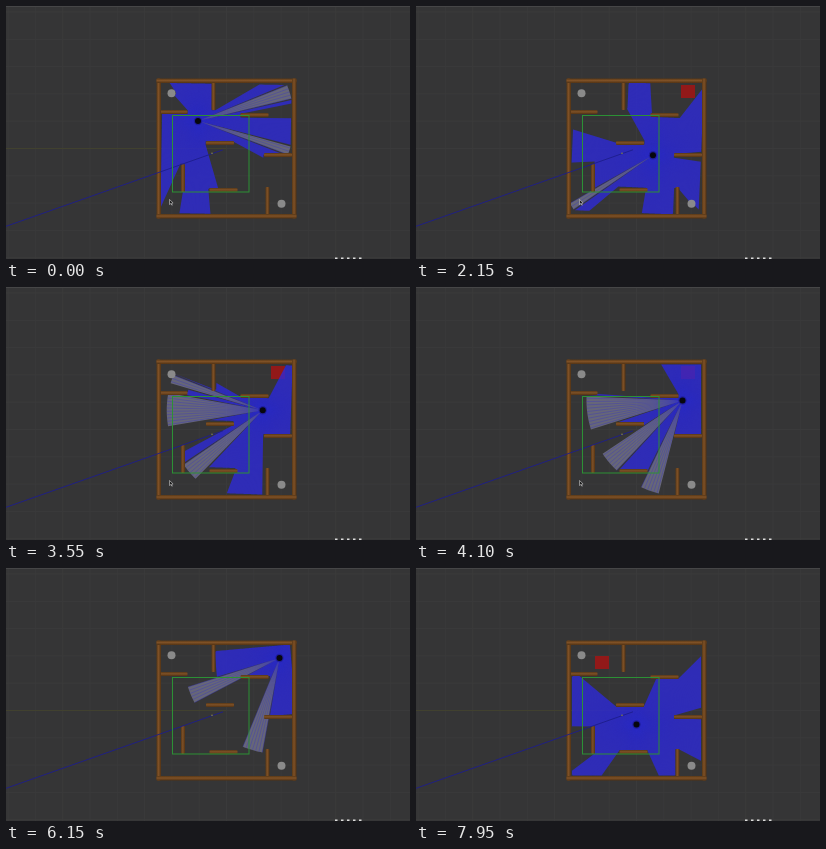
Recreate the animation shown at these times as an HTML page with a canvas. Size 404 px wide and 253 px high, loop 8 s.

```html
<!DOCTYPE html>
<html lang="en">
<head>
<meta charset="utf-8">
<title>Lidar robot in a maze</title>
<style>
  html, body { margin: 0; width: 100%; height: 100%; overflow: hidden; background: #353536; }
  canvas { display: block; width: 404px; height: 253px; }
</style>
</head>
<body>
<canvas id="stage"></canvas>
<script>
const W = 404, H = 253, LOOP = 8000, STEP = 50, TURN = Math.PI * 2;
const CX = 220.5, CY = 142.5;           // world origin on the stage
const HALF = 70, THICK = 4.5;           // outer wall
const REACH_X = 64.5, REACH_Y = 65;     // room as the lidar sees it
const RANGE = 96, RAYS = 360, POST_R = 4;

const canvas = document.getElementById('stage');
const ratio = window.devicePixelRatio || 1;
canvas.width = W * ratio;
canvas.height = H * ratio;
const ctx = canvas.getContext('2d');
ctx.scale(ratio, ratio);

// All inner walls share one size and are given by their centres.
const across = (x, y) => [x - 14, y - 2, 28, 4];
const upright = (x, y) => [x - 2, y - 14, 4, 28];
const walls = [
  across(167.5, 106), across(248.5, 109), across(214, 137),
  across(272, 149), across(217.5, 184),
  upright(207.5, 90), upright(177, 172), upright(261.5, 195)
];
const frame = [-1, 1].flatMap(side => {
  const shift = side * (HALF - THICK / 2) - THICK / 2;
  return [
    [CX + shift, CY - HALF, THICK, 2 * HALF],
    [CX - HALF, CY + shift, 2 * HALF, THICK]
  ];
});
const posts = [-1, 1].map(side => [CX + side * 55, CY + side * 55.2]);

// Key points: time, x, y, scan skew in degrees caused by turning
const robotKeys = [
  [0, 192, 115, 1], [700, 196, 148, 0], [1250, 220.5, 160.5, 0],
  [1900, 234, 154, 2], [3000, 247, 133, 4], [4100, 266.5, 113.5, 0],
  [5000, 271.5, 95, 8], [5400, 273.5, 90, -5], [6150, 273.5, 90, -5],
  [7000, 256, 126, 0], [7950, 220.5, 156.5, 0]
];
const cursorKeys = [
  [0, 163.5, 193.5], [4500, 163.5, 193.5], [5000, 104, 223.5],
  [5400, 87, 235], [6050, 127, 254]
];
const goals = [
  { from: 500, to: 4600, x: 272, y: 85.5 },
  { from: 6500, to: LOOP, x: 186, y: 94.5 }
];

function along(keys, t) {
  const i = keys.findIndex(key => key[0] > t);
  if (i < 0) return keys[keys.length - 1].slice(1);
  const a = keys[i - 1], b = keys[i];
  const k = (t - a[0]) / (b[0] - a[0]);
  return a.map((v, n) => v + (b[n] - v) * k).slice(1);
}

function hitBox(ox, oy, dx, dy, [x, y, w, h]) {
  const ax = (x - ox) / dx, bx = (x + w - ox) / dx;
  const ay = (y - oy) / dy, by = (y + h - oy) / dy;
  const near = Math.max(Math.min(ax, bx), Math.min(ay, by));
  const far = Math.min(Math.max(ax, bx), Math.max(ay, by));
  return near > 0 && near <= far ? near : Infinity;
}

function hitPost(ox, oy, dx, dy, [px, py]) {
  const b = (px - ox) * dx + (py - oy) * dy;
  const d = b * b - (px - ox) ** 2 - (py - oy) ** 2 + POST_R ** 2;
  return b > 0 && d > 0 ? b - Math.sqrt(d) : Infinity;
}

function castRay(ox, oy, angle, skew) {
  const dx = Math.cos(angle), dy = Math.sin(angle);
  const reach = Math.min(
    (CX + Math.sign(dx) * REACH_X - ox) / dx,
    (CY + Math.sign(dy) * REACH_Y - oy) / dy,
    ...walls.map(w => hitBox(ox, oy, dx, dy, w)),
    ...posts.map(p => hitPost(ox, oy, dx, dy, p)));
  const length = Math.min(reach, RANGE);
  return {
    x: ox + Math.cos(angle + skew) * length,
    y: oy + Math.sin(angle + skew) * length,
    hit: reach < RANGE
  };
}

function line(x0, y0, x1, y1, color, width = 1) {
  ctx.strokeStyle = color;
  ctx.lineWidth = width;
  ctx.beginPath();
  ctx.moveTo(x0, y0);
  ctx.lineTo(x1, y1);
  ctx.stroke();
}

function disc(x, y, r, color) {
  ctx.fillStyle = color;
  ctx.beginPath();
  ctx.arc(x, y, r, 0, TURN);
  ctx.fill();
}

function drawGround(t) {
  ctx.fillStyle = '#353536';
  ctx.fillRect(0, 0, W, H);
  const cell = 27.3;
  for (let x = CX % cell; x < W; x += cell) line(x, 0, x, H, '#3a3a3b');
  for (let y = CY % cell; y < H; y += cell) line(0, y, W, y, '#3a3a3b');
  line(0, 0.5, W, 0.5, '#464647');
  if (t < 400 || t >= 4600) line(0, CY, CX, CY, '#41412f');
}

function drawScan(ox, oy, skew) {
  const rays = Array.from({ length: RAYS }, (_, i) =>
    castRay(ox, oy, (i + 0.37) * TURN / RAYS, skew));
  const fan = (hit, color) => {
    ctx.fillStyle = color;
    ctx.beginPath();
    rays.forEach((a, i) => {
      const b = rays[(i + 1) % RAYS];
      if (a.hit !== hit || b.hit !== hit) return;
      ctx.moveTo(ox, oy);
      ctx.lineTo(a.x, a.y);
      ctx.lineTo(b.x, b.y);
    });
    ctx.fill();
  };
  fan(true, 'rgba(46,42,226,.74)');
  fan(false, 'rgba(128,128,156,.66)');
  rays.forEach((r, i) => {
    if (r.hit) line(ox, oy, r.x, r.y, 'rgba(42,40,205,.2)', 0.5);
    else if (i % 2) line(ox, oy, r.x, r.y, 'rgba(58,54,190,.65)', 0.6);
  });
}

function drawWall([x, y, w, h]) {
  const shade = w > h
    ? ctx.createLinearGradient(0, y, 0, y + h)
    : ctx.createLinearGradient(x, 0, x + w, 0);
  shade.addColorStop(0, '#583817');
  shade.addColorStop(0.45, '#7f5126');
  shade.addColorStop(1, '#513214');
  ctx.fillStyle = shade;
  ctx.beginPath();
  ctx.roundRect(x, y, w, h, 1);
  ctx.fill();
}

function drawGoal(t) {
  ctx.fillStyle = '#921919';
  goals.filter(g => t >= g.from && t < g.to)
    .forEach(g => ctx.fillRect(g.x - 7, g.y - 6.5, 14, 13));
}

function drawCursor(x, y) {
  ctx.beginPath();
  [[0, 0], [0, 5], [1.4, 4], [2.6, 5.8], [2.2, 3.6], [3.6, 3.4]]
    .forEach(([dx, dy]) => ctx.lineTo(x + dx, y + dy));
  ctx.closePath();
  ctx.fillStyle = '#1c1c1c';
  ctx.fill();
  ctx.strokeStyle = '#d0d0d0';
  ctx.lineWidth = 0.6;
  ctx.stroke();
}

function drawCaptionEdge() {
  ctx.fillStyle = '#dcdcdc';
  for (let x = 329; x < 357; x += 6) ctx.fillRect(x, 251.5, 2.5, 2);
}

function draw(t) {
  const [x, y, skew] = along(robotKeys, t);
  drawGround(t);
  drawGoal(t);
  drawScan(x, y, skew * TURN / 360);
  [...walls, ...frame].forEach(drawWall);
  posts.forEach(([px, py]) => disc(px, py, POST_R, '#8a8a8a'));
  line(0, 220.3, 217, 143.8, '#1e1e8c', 0.9);
  ctx.strokeStyle = '#2c9035';
  ctx.lineWidth = 1;
  ctx.strokeRect(166.5, 109.5, 76.5, 76.5);
  disc(206, 147.3, 0.8, '#8a8a42');
  disc(x, y, 4.2, 'rgba(20,18,110,.45)');
  disc(x, y, 3, '#07070d');
  if (t < 6050) drawCursor(...along(cursorKeys, t));
  drawCaptionEdge();
}

const start = performance.now();
function tick() {
  const t = (performance.now() - start) % LOOP;
  draw(Math.floor(t / STEP) * STEP);
  requestAnimationFrame(tick);
}
tick();
</script>
</body>
</html>
```
